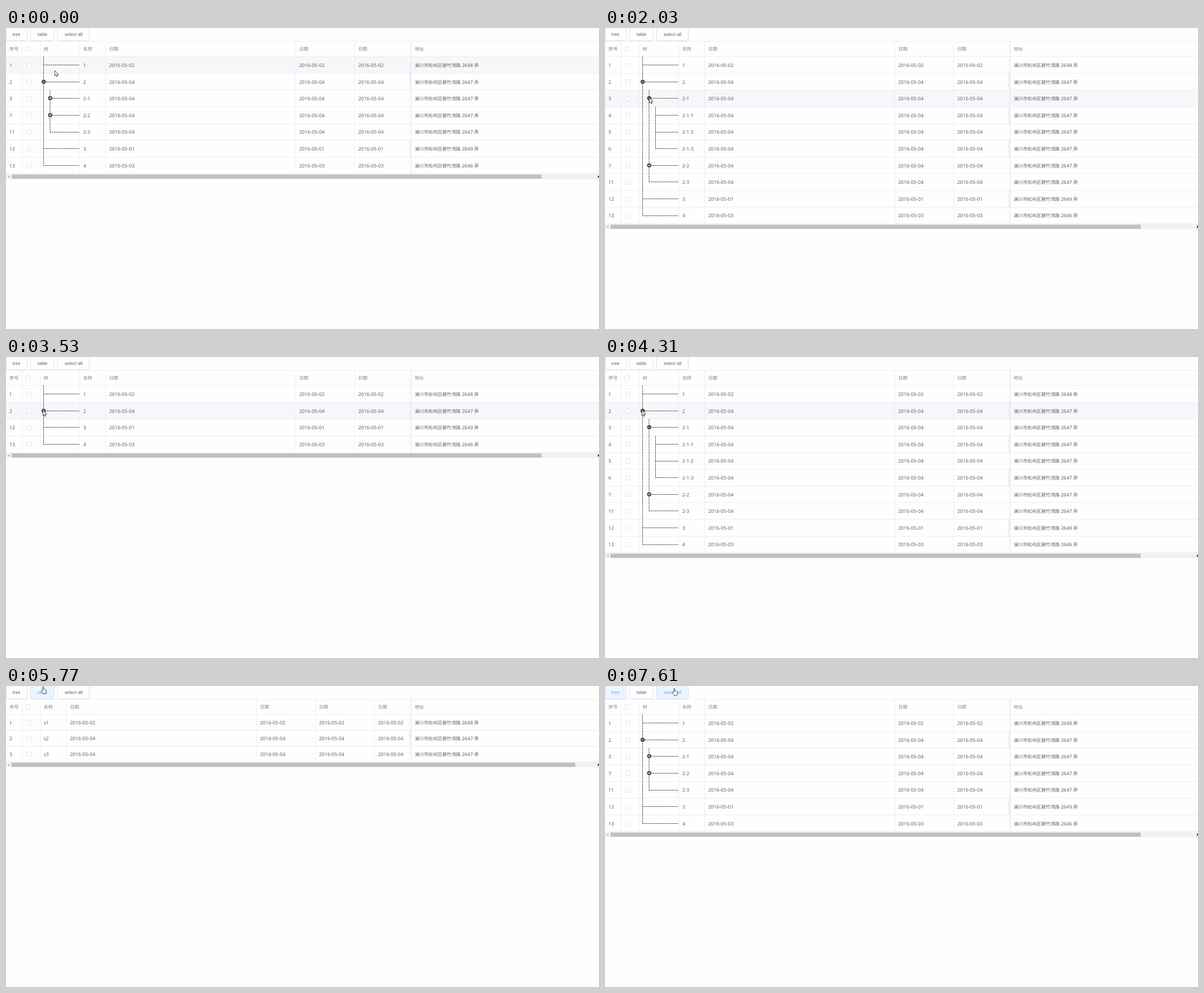
An HTML page for the animation above (8000 ms loop, 1050 px wide and 533 px high).

```html
<!DOCTYPE html>
<html lang="zh-CN">
<head>
<meta charset="utf-8">
<title>Tree table</title>
<style>
html, body { margin: 0; width: 100%; height: 100%; overflow: hidden; background: #fefefe; }
svg { display: block; width: 1050px; height: 533px; }
text { font: 8.6px "Noto Sans", "Open Sans", sans-serif; fill: #606266; text-rendering: geometricPrecision; white-space: pre; }
.cjk { font: 8.15px "Noto Sans CJK SC", "Noto Sans CJK", sans-serif; }
.head .cjk { font-weight: 500; fill: #7f8288; }
.btn text { font: 8.15px "Liberation Sans", Arial, sans-serif; }
.btn rect { fill: #fefefe; stroke: #dcdfe6; }
.hover rect { fill: #ecf5ff; stroke: #c6e2ff; }
.hover text { fill: #66a8f5; }
.active rect { fill: #ecf5ff; stroke: #4a90e2; }
.active text { fill: #6f9fe6; }
.fading text { fill: #5a7fae; }
.grid { stroke: #ebeef5; fill: none; }
.tree { stroke: #222; stroke-dasharray: 2 1.3; fill: none; }
.box { fill: #fff; stroke: #dcdfe6; stroke-width: .8; }
.cursor { fill: #fff; stroke: #111; stroke-width: .75; stroke-linejoin: round; }
</style>
</head>
<body>
<svg id="stage" viewBox="0 0 1050 533"></svg>
<script>
const LOOP = 8000, TOP = 51;
const stage = document.getElementById('stage');

// index, name, level, day, lane number
const nodes = [
  [1, '1', 0, 2, 2648], [2, '2', 0, 4, 2647], [3, '2-1', 1, 4, 2647],
  [4, '2-1-1', 2, 4, 2647], [5, '2-1-2', 2, 4, 2647], [6, '2-1-3', 2, 4, 2647],
  [7, '2-2', 1, 4, 2647], [11, '2-3', 1, 4, 2647], [12, '3', 0, 1, 2649], [13, '4', 0, 3, 2646]
];
const flat = [[1, 's1', 0, 2, 2648], [2, 's2', 0, 4, 2647], [3, 's3', 0, 4, 2647]];

// time, x, y, shape
const moves = [
  [0, 86, 75], [120, 85, 76], [240, 82, 79], [360, 78, 84], [480, 76, 88],
  [630, 74, 92], [750, 74, 98], [870, 75, 105], [990, 76, 112], [1110, 79, 118], [1230, 81, 123],
  [1380, 80, 124], [1500, 78, 123], [2460, 74, 114], [2580, 68, 105], [2730, 67, 97],
  [2880, 66, 95], [3000, 65, 94], [4710, 74, 62], [4830, 55, 28], [4950, 65, -2],
  [5100, 65, -30], [5250, 62, 2, 'hand'], [5530, 62, 1, 'hand'], [6050, 41, 10, 'hand'],
  [6200, 11, 9, 'hand'], [6320, 26, 15, 'hand'], [6470, 22, 14, 'hand'],
  [7210, 88, 10], [7330, 106, 8, 'hand'], [7480, 115, 6, 'hand'], [7610, 119, 4, 'hand']
];
const shapes = {
  arrow: 'M.4.4V9.8L2.5 7.8 4 11.1 5.5 10.4 4.1 7.3H7Z',
  hand: 'M2.9 7.3V1.3Q2.9.4 3.8.4T4.7 1.3V4.8Q6.1 4.4 6.2 5.2 7.6 4.9 7.8 5.7 9.2 5.5 9.2 6.6V9.4L8.3 12.8H3.8L.6 8.6Q.2 7.2 1.4 6.9Z'
};

// time, class for each button: tree, table, select all
const buttonStates = [
  [0, '', '', ''], [5250, '', 'hover', ''], [5530, '', 'active', ''], [5770, '', 'hover', ''],
  [6640, 'hover', 'fading', ''], [6790, 'active', '', ''], [6940, 'hover', '', ''], [7330, 'hover', '', 'hover']
];
const tableStates = [[0, 'short'], [2030, 'open'], [3530, 'closed'], [4310, 'open'], [5770, 'flat'], [6940, 'short']];

const at = (list, t) => list.filter(item => item[0] <= t).pop();
const rect = (x, y, w, h, attrs) => `<rect x="${x}" y="${y}" width="${w}" height="${h}" ${attrs}/>`;
const path = (d, cls) => `<path class="${cls}" d="${d}"/>`;
const text = (x, y, s) =>
  `<text x="${x}" y="${y}">${String(s).replace(/[^\x00-\xff]+/g, m => `<tspan class="cjk">${m}</tspan>`)}</text>`;

function visibleRows(mode) {
  if (mode === 'flat') return flat;
  const depth = { closed: 0, short: 1, open: 2 }[mode];
  return nodes.filter(n => n[2] <= depth);
}

function drawButtons(classes) {
  return [['tree', .5, 37], ['table', 43.5, 41.5], ['select all', 91.5, 56]].map(([label, x, w], i) =>
    `<g class="btn ${classes[i]}">${rect(x, -.3, w, 22.8, 'rx="2"')}${text(x + (i ? 12.2 : 11), 14, label)}</g>`).join('');
}

function drawTree(rows, mode, mid) {
  let lines = '', knobs = '';
  for (let level = 0; level < 3; level++) {
    const members = rows.map((r, i) => i).filter(i => rows[i][2] === level);
    if (!members.length) continue;
    const x = [66.5, 78, 89.5][level];
    lines += `M${x} ${mid(members[0]) - 14.8}V${mid(members.at(-1))}`;
    for (const i of members) {
      const y = Math.floor(mid(i) - .2) + .5;
      lines += `M${x} ${y}H130`;
      const name = rows[i][1];
      if (!['2', '2-1', '2-2'].includes(name)) continue;
      const open = name === '2' ? mode !== 'closed' : name === '2-1' && mode === 'open';
      knobs += `<circle cx="${x + .2}" cy="${y - .3}" r="3.7" fill="#484848"/>` +
        `<path d="M${x - 1.6} ${y - .3}h3.6${open ? '' : `M${x + .2} ${y - 2.1}v3.6`}" stroke="#fff" stroke-width=".9"/>`;
    }
  }
  return path(lines, 'tree') + knobs;
}

function drawScrollbar(y, end) {
  return rect(0, y, 1050, 9.2, 'fill="#f1f1f1"') + rect(10, y + 1, end - 10, 7.3, 'fill="#bfbfbf"') +
    `<path d="M6 ${y + 3}v3.6l-2.4-1.8z" fill="#999"/><path d="M1048 ${y + 2.4}v4.6l3-2.3z" fill="#222"/>`;
}

function drawTable(mode, hoverY, residue) {
  const isFlat = mode === 'flat', rows = visibleRows(mode);
  const height = isFlat ? 27.85 : 29.6, bottom = TOP + rows.length * height;
  const mid = i => TOP + (i + .5) * height;
  const edges = isFlat ? [28.5, 60.5, 107, 443.5, 548, 652.5, 717.5] : [28.5, 60.5, 130.5, 176.5, 513, 617.5, 717.5];
  const heads = isFlat ? ['名称', '日期', '日期', '日期', '日期', '地址'] : ['树', '名称', '日期', '日期', '日期', '地址'];
  const shaded = { short: [1, 5], closed: [1], open: [1, 3, 5, 8], flat: [1] }[mode];
  const hovered = hoverY < TOP ? -1 : Math.floor((hoverY - TOP) / height);
  let back = '', body = '', lines = 'M0 23.5H1050M0 50.5H1050';

  rows.forEach(([index, name, , day, lane], i) => {
    const y = mid(i), y0 = y - height / 2, base = y + 3.2;
    const fill = i === hovered ? '#f5f7fa' : residue && i === 1 ? '#fafafa' : '';
    if (fill) back += rect(0, y0, 1050, height, `fill="${fill}"`);
    if (shaded.includes(i)) back += rect(714, y0, 3, height, 'fill="#f1f1f2"');
    lines += `M0 ${Math.floor(y0 + height - .3) + .5}H1050`;
    const date = `2016-05-0${day}`;
    const cells = [isFlat ? name : '', isFlat ? date : name, date, date, date, `澜川市松屿区碧竹湾路 ${lane} 弄`];
    body += text(6, base, index) + rect(37.3, y - 3.7, 7.7, 7.7, 'class="box" rx="1"');
    cells.forEach((s, c) => { if (s) body += text(edges[c + 1] + 6.2, base, s); });
  });
  edges.forEach(x => lines += `M${x} 23V${bottom}`);

  const head = text(6, 40, '序号') + rect(35, 33.2, 7.7, 7.7, 'class="box" rx="1"') +
    heads.map((s, c) => text(edges[c + 1] + 6.2, 40, s)).join('');
  return back + path(lines, 'grid') + rect(716.5, 23, 1, bottom - 23, 'fill="#e4e6ea"') +
    `<g class="head">${head}</g>` + body + (isFlat ? '' : drawTree(rows, mode, mid)) +
    drawScrollbar(bottom + .3, isFlat ? 1008 : 948.5);
}

let last = '';
function frame(now) {
  const t = now % LOOP;
  const [, x, y, shape = 'arrow'] = at(moves, t);
  const mode = at(tableStates, t)[1];
  const residue = t >= 990 && t < 2030;
  const picture = drawTable(mode, y, residue) + drawButtons(at(buttonStates, t).slice(1)) +
    `<path class="cursor" transform="translate(${x} ${y})" d="${shapes[shape]}"/>`;
  if (picture !== last) stage.innerHTML = last = picture;
  requestAnimationFrame(frame);
}
requestAnimationFrame(frame);
</script>
</body>
</html>
```
